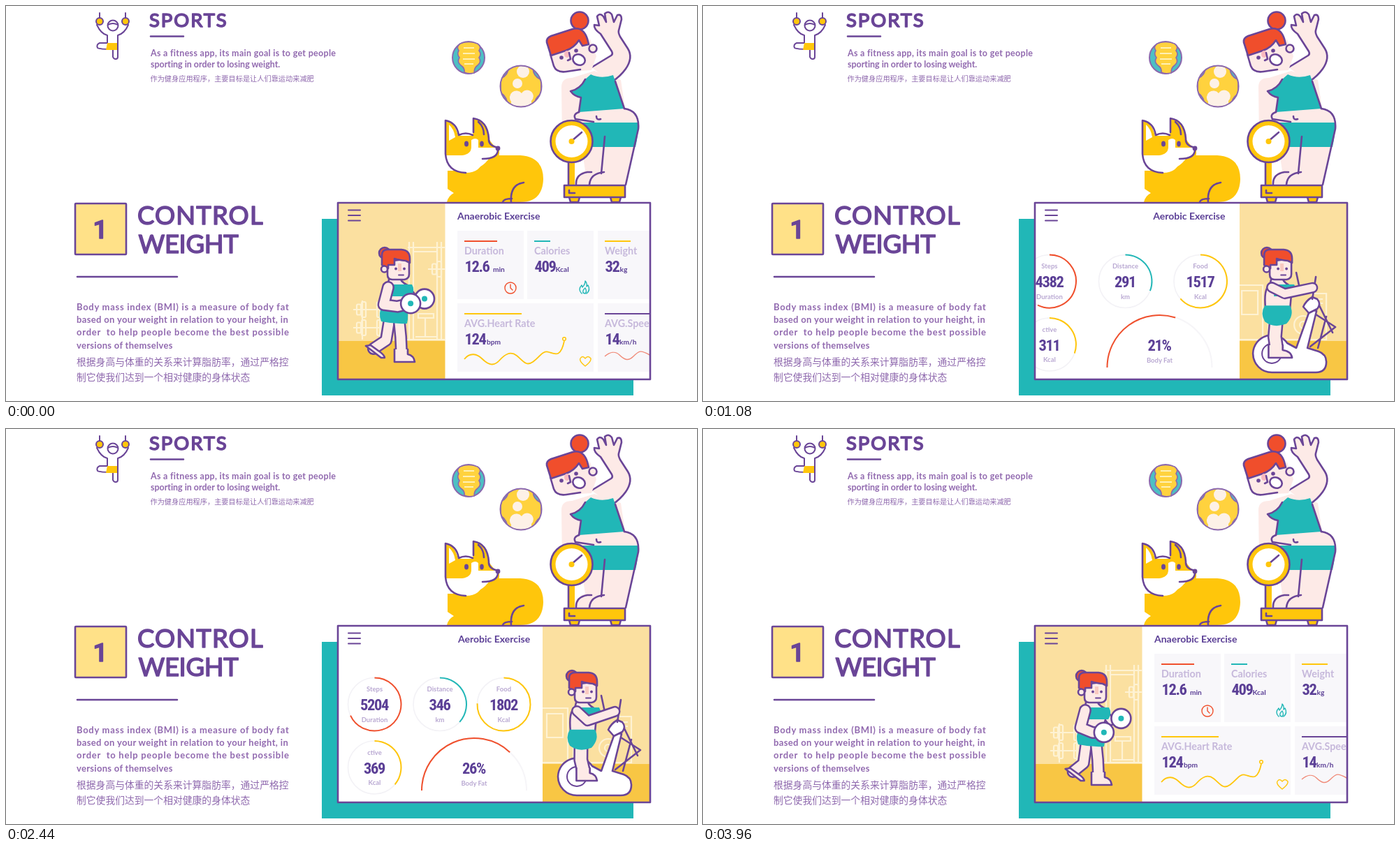
Animation of 989x566 px, one loop 4000 ms. Source, as an HTML page:

```html
<!DOCTYPE html>
<html lang="en">
<head>
<meta charset="utf-8">
<title>Control weight</title>
<style>
html,body{margin:0;width:100%;height:100%;overflow:hidden;background:#fff}
svg{display:block}
text{font-family:Lato,"Noto Sans",sans-serif;font-weight:700;fill:#5b3f96;white-space:pre}
.cjk{font-family:"Noto Sans CJK SC","Noto Sans CJK",sans-serif;font-weight:500;fill:#8f69ae}
.head{font-weight:400;fill:#6a4597;stroke:#6a4597;stroke-width:1.6;stroke-linejoin:round}
.one{font-family:Roboto,sans-serif;font-weight:500}
.body{fill:#9169af}
.num{font-family:"Roboto Condensed",Roboto,sans-serif;font-weight:600;font-stretch:75%;letter-spacing:-1.4px}
.dim{fill:#b9a8d2}
.lab{fill:#c6b8db}
.o{stroke:#6a4597;stroke-width:2.6;stroke-linecap:round;stroke-linejoin:round}
.thin{stroke-width:2}
.l{fill:none}
.ink{fill:#6a4597}.teal{fill:#21b7b7}.sun{fill:#ffc60b}.red{fill:#f04e2c}
.skin{fill:#fdeae7}.white{fill:#fff}
.gear{fill:none;stroke:#fef2d3;stroke-width:2.2}
</style>
</head>
<body>
<svg id="stage" width="989" height="566" viewBox="0 0 989 566">
<defs>
<clipPath id="card"><rect x="475" y="283" width="446" height="251"/></clipPath>
<clipPath id="bone"><circle cx="737" cy="115" r="29"/></clipPath>
</defs>
<g id="copy"></g>

<g id="gymnast" class="o thin">
<path class="l" d="M134 10V17M171 10V17"/>
<path class="white" d="M130 27Q136 40 145 42V53H134Q129 55 131 60Q134 62 153 62V73Q154 76 157 76Q160 76 160 73V42Q170 39 175 27"/>
<path class="sun" stroke="none" d="M145 53H159V63H143Z"/>
<circle class="sun" cx="134" cy="22" r="5"/><circle class="sun" cx="171" cy="22" r="5"/>
<circle class="white" cx="153" cy="28" r="7.500"/><path class="l" d="M146 27Q153 23 160 27"/>
</g>
<path class="o" d="M207 43.5H254M102 388H245"/>
<rect class="o" x="99" y="283" width="73" height="73" rx="1" fill="#ffe188"/>
<text class="head one" x="135" y="333" font-size="37" text-anchor="middle">1</text>

<g id="organs" stroke="#8b68ae" stroke-width="2">
<circle cx="662" cy="74" r="23" fill="#4cc0c4"/>
<path fill="#ffd23e" stroke-width="1.6" d="M650 54Q662 49 675 54Q681 58 677 64Q681 69 677 74Q681 80 675 85Q670 88 670 96Q661 98 656 95Q657 89 651 85Q645 80 649 74Q645 69 648 64Q644 58 650 54Z"/>
<path class="l" stroke="#fff0b4" d="M655 60H670M654 68H671M654 76H671M656 83H669"/>
<g clip-path="url(#bone)"><circle cx="737" cy="115" r="29.5" fill="#4cc0c4"/>
<path fill="#ffd23e" stroke-width="1.6" d="M718 82Q722 98 708 104V124Q720 132 718 150H756Q754 132 766 126V106Q750 98 756 82Z"/>
<g fill="#fdf1e7" stroke="none"><circle cx="740" cy="94" r="9"/><circle cx="732" cy="111" r="7"/><path d="M723 148V137A9 9 0 1 1 738 125A9 9 0 1 1 752 136V148Z"/></g></g>
<circle class="l" cx="737" cy="115" r="29.5"/>
</g>

<g id="dog">
<path class="sun" d="M631 281Q633 272 641 268L632 262V236H665Q686 230 694 214H736Q769 216 769 248Q768 281 736 281Z"/>
<path class="sun" d="M629 163Q642 166 647 186H668L670 161Q688 164 690 188Q697 202 706 204V213Q700 224 629 215Z"/>
<path class="white" d="M629 214H653Q666 212 666 202V192Q672 188 676 192V203H704Q704 219 683 219Q680 239 658 239Q631 238 629 214Z"/>
<path class="white" d="M634 170Q641 176 643 188L634 193Z"/>
<path class="o l" d="M629 212V164Q645 167 648 185Q658 180 668 185M669 181V161Q689 164 691 190Q690 200 704 203M704 206Q704 219 682 219M629 212Q631 238 658 239M723 281Q721 256 741 253M711 281Q712 276 724 276M676 166Q684 173 684 184"/>
<circle class="ink" cx="704" cy="204" r="3.4"/><ellipse class="ink" cx="659" cy="197.500" rx="3" ry="4"/><ellipse class="ink" cx="681" cy="197.500" rx="2.8" ry="4"/>
</g>

<g id="woman">
<path class="skin" d="M795 116Q795 103 810 103L842 93L880 106L886 147Q905 152 905 176L886 257H815Q816 240 829 236L822 190H796Z"/>
<path class="o skin" d="M838 88L866 71Q869 69 867 65L851 40Q841 33 842 27L849 28L846 15Q850 9 855 15L859 23L857 11Q862 6 867 12L870 23L875 13Q881 11 881 19L877 35Q876 38 879 44L890 61Q898 74 887 90Q880 100 867 109"/>
<path class="skin" d="M778 64L784 86Q788 96 802 94L838 92L845 72L836 48Z"/>
<path class="o l" d="M779 69L784 86Q788 96 802 94L822 91"/>
<circle class="o skin" cx="840" cy="61" r="5.500"/>
<circle class="o red" cx="821" cy="21" r="12.500"/>
<path class="o red" d="M780 71L774 52Q773 46 780 43L811 33Q826 29 832 47L834 55L825 57L820 49Q813 60 801 64Z"/>
<ellipse cx="803" cy="69" rx="4" ry="5" fill="#f9b9c0"/>
<circle class="ink" cx="795" cy="74" r="2.800"/><circle class="ink" cx="816" cy="64" r="2.800"/>
<path class="o l" d="M806 67L808 76L804 78"/><ellipse class="o white" cx="820" cy="77" rx="9" ry="7.500" transform="rotate(25 820 77)"/>
<path class="teal" d="M808 122Q821 119 829 105L837 98Q852 105 869 99L885 147L820 152L823 131Q814 129 808 122Z"/>
<path class="o l" d="M829 105Q822 119 808 122Q814 130 823 131L820 152M872 108L885 147"/>
<path class="teal" d="M818 167H904Q906 180 901 202H836Z"/>
<path class="o l" d="M885 147Q907 150 905 176L887 256M857 187L852 240M816 256Q815 241 832 238H838M835 256Q836 240 856 238M845 158Q845 164 851 162M820 152Q811 155 815 162L841 166"/>
<path class="sun" d="M805 220H814V257H805Z"/><path class="o l" d="M805 225V256"/>
<circle class="o sun" cx="809.500" cy="194" r="30"/><circle class="white" cx="809.500" cy="194" r="23"/>
<path class="o" d="M810 193L824 181"/><circle class="sun" cx="809.500" cy="194" r="4"/>
<path class="o sun" d="M806 274H821L819 281H808ZM865 274H880L878 281H867ZM799 257H886V274H799Z"/>
<path class="o l" d="M806 264V268H814"/>
</g>

<rect class="teal" x="452" y="305" width="446" height="253"/>
<rect class="white" x="475" y="283" width="447" height="252"/>
<g id="app" clip-path="url(#card)"></g>
<rect class="o l" x="475" y="282" width="447" height="253"/>
</svg>
<script>
const LOOP = 4000, SHIFT = 268;
const RED = '#f0502d', TEAL = '#21b7b7', SUN = '#ffc60b', INK = '#6a4597';
const $ = id => document.getElementById(id);
const text = (x, y, size, str, cls = '', extra = '') =>
  `<text x="${x}" y="${y}" font-size="${size}" class="${cls}" ${extra}>${str}</text>`;
const spaced = n => `letter-spacing="${n}"`;
const path = (d, cls, extra = '') => `<path d="${d}" class="${cls}" ${extra}/>`;
const disc = (x, y, r, cls, extra = '') => `<circle cx="${x}" cy="${y}" r="${r}" class="${cls}" ${extra}/>`;
const group = (inner, x = 0, alpha = 1) =>
  alpha <= 0.004 ? '' : `<g transform="translate(${x.toFixed(2)} 0)" opacity="${Math.min(1, alpha).toFixed(3)}">${inner}</g>`;
const limb = (d, w) =>
  path(d, 'l', `stroke="${INK}" stroke-width="${w}" stroke-linecap="round" stroke-linejoin="round"`) +
  path(d, 'l', `stroke="#fdeae7" stroke-width="${w - 5}" stroke-linecap="round" stroke-linejoin="round"`);

// Smooth curve through time/value pairs, flat at both ends.
function curve(t, ...k) {
  const n = k.length / 2, T = i => k[2 * i], V = i => k[2 * i + 1];
  if (t <= T(0)) return V(0);
  if (t >= T(n - 1)) return V(n - 1);
  let i = 0;
  while (t > T(i + 1)) i++;
  const slope = j => {
    if (j < 1 || j > n - 2) return 0;
    const a = V(j) - V(j - 1), b = V(j + 1) - V(j);
    return a * b <= 0 ? 0 : (a + b) / (T(j + 1) - T(j - 1));
  };
  const h = T(i + 1) - T(i), s = (t - T(i)) / h, r = 1 - s;
  return r * r * (1 + 2 * s) * V(i) + s * s * (3 - 2 * s) * V(i + 1) +
    h * s * r * (r * slope(i) - s * slope(i + 1));
}
function quint(p) {
  p = Math.max(0, Math.min(1, p));
  return p < 0.5 ? 16 * p ** 5 : 1 - 16 * (1 - p) ** 5;
}

$('copy').innerHTML =
  text(205, 30, 27.5, 'SPORTS', 'head', spaced(1.9)) +
  text(207, 71.5, 12.5, 'As a fitness app, its main goal is to get people', 'body', spaced(.3)) +
  text(207, 87.5, 12.5, 'sporting in order to losing weight.', 'body', spaced(-.03)) +
  text(206.5, 107.5, 10.2, '作为健身应用程序，主要目标是让人们靠运动来减肥', 'cjk') +
  text(188, 312.5, 36.5, 'CONTROL', 'head', spaced(1.1)) +
  text(189.5, 353.5, 36.5, 'WEIGHT', 'head', spaced(-.4)) +
  text(101, 435.5, 13, 'Body mass index (BMI) is a measure of body fat', 'body', spaced(.71)) +
  text(101, 453.5, 13, 'based on your weight in relation to your height, in', 'body', spaced(.35)) +
  text(101, 472, 13, 'order\u00a0 to help people become the best possible', 'body', spaced(.76)) +
  text(101, 490.5, 13, 'versions of themselves', 'body', spaced(.3)) +
  text(101, 514.5, 13.8, '根据身高与体重的关系来计算脂肪率，通过严格控', 'cjk') +
  text(101, 536.5, 13.8, '制它使我们达到一个相对健康的身体状态', 'cjk');

const head =
  disc(542, 354, 8, 'o red') +
  path('M546 366V385Q546 392 553 392H570Q577 391 577 384V362Z', 'o skin') +
  path('M561 369h5v11h-5z', '', 'fill="#f9c9c0"') +
  path('M538 371V357Q538 349 546 349H566Q578 350 578 362V368L572 365Q562 364 556 362V371H547V376Z', 'o red') +
  disc(541.5, 377, 4.5, 'o skin') +
  disc(558, 376.5, 1.9, 'ink') + disc(570, 376.5, 1.9, 'ink') + path('M562 385.500h7', 'o l', 'style="stroke-width:1.8"');

const plates = (x, y) => [0, 7, 29, 36].map((dx, i) => {
  const h = i % 3 ? 22 : 15;
  return `<rect x="${x + dx}" y="${y - h / 2}" width="6" height="${h}" rx="2" class="gear"/>`;
}).join('');
const gymGear = path(
  'M577 338V478M583 338V478M617 338V478M623 338V478M575 346H632M583 352H617M572 478H632' +
  'M604 377H640M590 441H612V447H590ZM600 447V474M586 474H616' +
  'M510 422V478M535 422V478M497 435H549M497 461H549', 'gear') +
  plates(502, 435) + plates(502, 461) + plates(610, 377);
const bikeGear = path(
  'M768 400H804V478H768M774 408H797V442H774ZM812 397V478M818 412H895V478H818ZM826 419H840V430H826Z' +
  'M849 457a13 13 0 1 0 26 0a13 13 0 1 0 -26 0M857 457a5 5 0 1 0 10 0a5 5 0 1 0 -10 0M880 420H890M880 426H890', 'gear');

const bike = group(
  path('M866 433L908 460L872 488M881 421L904 468M895 445L883 490', 'o l') +
  path('M790 498A27 27 0 0 1 839 483L852 490L872 434L881 437L868 490L884 495Q895 499 895 510Q895 525 880 525H817A27 27 0 0 1 790 498Z', 'o white') +
  path('M862 431Q866 422 875 417L882 420Q888 427 882 434L870 440Z', 'o white') +
  disc(817, 498, 14, 'o l thin') + path('M852 382L858 410M880 388L875 420', 'o l'), -SHIFT);

const weight = (x, y) => disc(x, y, 14, 'o white') + disc(x, y, 4, 'teal');

// One athlete: legs and torso turn from lifting (0) to cycling (1), props and arms fade.
function athlete(t, mix) {
  const turn = 1 - (1 - mix) ** 2, mid = (a, b) => a + (b - a) * turn;
  const solo = Math.min(1, 1.5 * (1 - mix));
  const u = .5 + .5 * Math.sin(2 * Math.PI * t / 800);
  const w = .5 - .5 * Math.cos(2 * Math.PI * (t - 1300) / 800);
  const ax = 557 + 58 * u - 28 * u * u, ay = 452 - 45 * u - 12 * u * u;
  const bx = 597 + 4 * u, by = 404 + 31 * u, rear = 527 - 24 * u;
  const hip = 4 * w * turn, drop = mid(2, 0) + hip;
  const heel = mid(556, 538 + 11 * w), toe = mid(585, 578), sole = mid(510, 504);
  const ankle = mid(566, 551 + 8 * w), knee = mid(565, 551 + 4 * w);

  const rearLeg = limb(`M548 454L${546 - 4 * u} 479L${rear + 11} 491`, 18) +
    path(`M${rear} 487L${rear + 7} 486L${rear + 18} 494Q${rear + 27} 500 ${rear + 27} 504L${rear + 22} 504Z`, 'o skin');
  const rearArm = limb(`M574 407L584 ${416 + 8 * u}L${bx} ${by}`, 13) + weight(bx, by);
  const frontLeg = limb(`M${mid(563, 555)} ${452 + drop}L${knee} 474L${ankle} ${sole - 14}`, mid(18, 21)) +
    path(`M${heel} ${sole - 18}V${sole}H${toe}Q${toe - 1} ${sole - 9} ${ankle + 9} ${sole - 11}V${sole - 18}`, 'o skin');
  const torso = path(`M549 388L546 400Q537 405 540 434H${mid(571, 575)}L${mid(580, 578)} 402Q567 398 564 390Z`, 'o skin') +
    path('M553 399H581Q586 407 580 416H552Z', 'teal') +
    path(`M539 ${427 + drop}H${mid(573, 575)}Q${mid(577, 582)} ${440 + drop} ${mid(574, 570)} ${453 + drop}` +
      `Q${mid(556, 552)} ${mid(454, 460) + drop} ${mid(537, 539)} ${450 + drop}Q532 ${438 + drop} 539 ${427 + drop}Z`, 'teal');
  const liftArm = limb(`M547 403L${540 + u} 428L${(ax + 541) / 2} ${(ay + 431) / 2 + 2}L${ax} ${ay}`, 18) + weight(ax, ay);
  const rideArm = limb(`M549 ${402 + 2 * w}L${572 - 8 * w} ${403 + 16 * w}L${613 - 10 * w} ${402 + 3 * w}`, 16);

  return group(rearLeg, 0, 1 - turn) + group(bike, 0, mix) + group(rearArm, 0, solo) +
    frontLeg + torso + group(liftArm, 0, solo) + group(rideArm, 0, mix * mix) + head;
}

function arc(x, y, r, from, sweep, color) {
  const at = a => `${x + r * Math.sin(a * Math.PI / 180)} ${y - r * Math.cos(a * Math.PI / 180)}`;
  return path(`M${at(from)}A${r} ${r} 0 ${sweep > 180 ? 1 : 0} 1 ${at(from + sweep)}`, 'l',
    `stroke="${color}" stroke-width="2"`);
}

const mid = 'text-anchor="middle"';
const trio = (x, y, label, value, unit) =>
  text(x, y - 18.5, 9.5, label, 'dim', mid) + text(x - .5, y + 8.5, 22.5, value, 'num', mid) + text(x, y + 25, 9.5, unit, 'dim', mid);

// label, value, unit, x, y, sweep, colour, lag
const rings = [
  ['Steps', 5204, 'Duration', 527.5, 394.5, 245, RED, 2],
  ['Distance', 346, 'km', 621, 394.5, 132, TEAL, 1],
  ['Food', 1802, 'Kcal', 712.5, 394.5, 272, SUN, 0],
  ['ctive', 369, 'Kcal', 527.5, 485, 130, SUN, 2]
];
const ringX = (t, k) => t < 2300
  ? curve(t, 484, -300, 800, -121 - 33 * k, 1000, -18 - 22 * k, 1160, 3 - 9 * k, 1400, 1.5 - 2.7 * k, 1900, 0)
  : curve(t, 2527, 0, 2860, -180);

function aerobic(t) {
  const fill = s => curve(s, 690, 0, 800, .173, 1000, .7, 1250, 1);
  const p = fill(t), q = fill(t - 20);
  const alpha = t < 2300 ? curve(t, 640, 0, 800, .55, 960, 1) : curve(t, 2527, 1, 2780, 0);
  const small = rings.map(([label, v, unit, x, y, sweep, color, k]) => group(
    disc(x, y, 38, 'l', 'stroke="#f3f2f6" stroke-width="1.600"') + arc(x, y, 38, 0, sweep * p, color) +
    trio(x, y, label, Math.round(v * p), unit), ringX(t, k)));
  const fat = arc(670, 518, 75, -90, 180, '#f6f5f8') + arc(670, 518, 75, -90, 133 * q, RED) +
    text(669.5, 494, 22.5, Math.round(26 * q) + '%', 'num', mid) + text(670, 510.5, 9.5, 'Body Fat', 'dim', mid);
  return group(small.join('') + group(fat, ringX(t, 1)), 0, alpha);
}

const icon = (d, color) => path(d, 'l', `stroke="${color}" stroke-width="1.400" stroke-linejoin="round" stroke-linecap="round"`);
const clock = icon('M714 404a8 8 0 1 0 16 0a8 8 0 1 0 -16 0M722 399V404L725 407', RED);
const flame = icon('M824 412Q818 406 824 400L825 403Q829 399 829 394Q832 397 831 402L833 400Q837 407 831 412M826 411Q825 407 829 404Q832 409 829 412Z', TEAL);
const heart = icon('M829 516Q820 509 822 505Q825 500 829 505Q833 500 837 505Q838 509 829 516Z', SUN);
const beat = 'M656 506C664 496 674 498 682 506S698 517 706 508S722 494 731 501S744 517 754 510S768 493 777 496S794 504 799 480';

function tile(x, y, w, bar, color, label, value, unit, unitX, extra = '') {
  return `<rect x="${x}" y="${y}" width="${w}" height="98" fill="#f8f7fa"/>` +
    path(`M${x + 10} ${y + 15}h${bar}`, 'l', `stroke="${color}" stroke-width="2"`) +
    text(x + 10, y + 34, 14.3, label, 'lab') + text(x + 10.5, y + 59, 22.5, value, 'num') +
    text(x + unitX, y + 59, 10.2, unit) + extra;
}

function anaerobic(t) {
  const fill = s => s < 1600 ? 1 : curve(s, 2640, 0, 2960, .45, 3200, 1);
  const p = fill(t), lead = fill(t + 50);
  const at = k => t < 1600 ? curve(t, 484, 0, 800, 150)
    : curve(t, 2600, 330, 2960, 31 + 19 * k, 3120, 11, 3280, 5 - 2 * k, 3800, 0);
  const alpha = t < 1600 ? curve(t, 500, 1, 760, 0) : curve(t, 2680, 0, 2900, 1);
  const n = v => Math.round(v * p);
  const line = path(beat, 'l', `pathLength="1" stroke="${SUN}" stroke-width="1.800" stroke-dasharray="${p * 1.02} 2"`) +
    (p > .98 ? disc(799, 477, 2.3, 'white', `stroke="${SUN}" stroke-width="1.500"`) : '');
  const pace = path('M857 502C864 496 872 494 878 500S890 510 898 502S908 492 923 501', 'l', `stroke="#f08a78" stroke-width="1.400"`);
  return group(
    group(tile(646, 322, 95, 47, RED, 'Duration', (12.6 * lead).toFixed(1), 'min', 51, clock), at(0)) +
    group(tile(746, 322, 95, 23, TEAL, 'Calories', n(409), 'Kcal', 40.5, flame), at(1)) +
    group(tile(847, 322, 95, 37, SUN, 'Weight', n(32), 'kg', 31.5), at(3)) +
    group(tile(646, 426, 195, 82, SUN, 'AVG.Heart Rate', n(124), 'bpm', 42, heart + line), at(1)) +
    group(tile(847, 426, 195, 82, INK, 'AVG.Speed', n(14), 'km/h', 31, pace), at(3)), 0, alpha);
}

function draw(t) {
  const move = quint((t - 484) / 600) - quint((t - 2527) / 600);
  const left = 475 + 293 * move;
  const dx = t < 2000 ? curve(t, 484, 0, 800, 152, 1084, 266, 1200, SHIFT)
    : curve(t, 2527, SHIFT, 2800, 110, 2960, 15, 3280, 3, 3600, 0);
  const mix = t < 2000 ? curve(t, 560, 0, 800, .5, 1040, 1)
    : curve(t, 2527, 1, 2800, .4, 2960, .05, 3060, 0);
  const titleA = t < 2000 ? curve(t, 484, 505, 800, 559, 1084, 645, 1150, 647) : curve(t, 2527, 647, 2960, 515, 3060, 505);
  const titleB = t < 2000 ? curve(t, 484, 646, 800, 715, 1084, 780) : curve(t, 2527, 780, 2960, 671, 3160, 648, 3270, 646);
  const seenB = t < 2000 ? curve(t, 560, 1, 800, .68, 1040, 0) : curve(t, 2527, 0, 2800, .6, 2940, 1);
  $('app').innerHTML =
    aerobic(t) + anaerobic(t) +
    `<svg x="${left}" y="283" width="153.500" height="252" viewBox="${left} 283 153.500 252">` +
    `<rect x="${left}" y="283" width="154" height="197" fill="#fbe0a0"/><rect x="${left}" y="480" width="154" height="55" fill="#f8c644"/>` +
    group(gymGear, dx, 1 - mix) + group(bikeGear, dx - SHIFT, mix) + '</svg>' +
    group(athlete(t, mix), dx) +
    group(text(0, 305.5, 14, 'Aerobic Exercise'), titleA, mix) +
    group(text(0, 305.5, 14, 'Anaerobic Exercise'), titleB, seenB) +
    path('M490 292.500H507M490 300H507M490 307.500H507', 'o l thin');
}

function tick(now) {
  draw(now % LOOP);
  requestAnimationFrame(tick);
}
draw(0);
requestAnimationFrame(tick);
</script>
</body>
</html>
```
